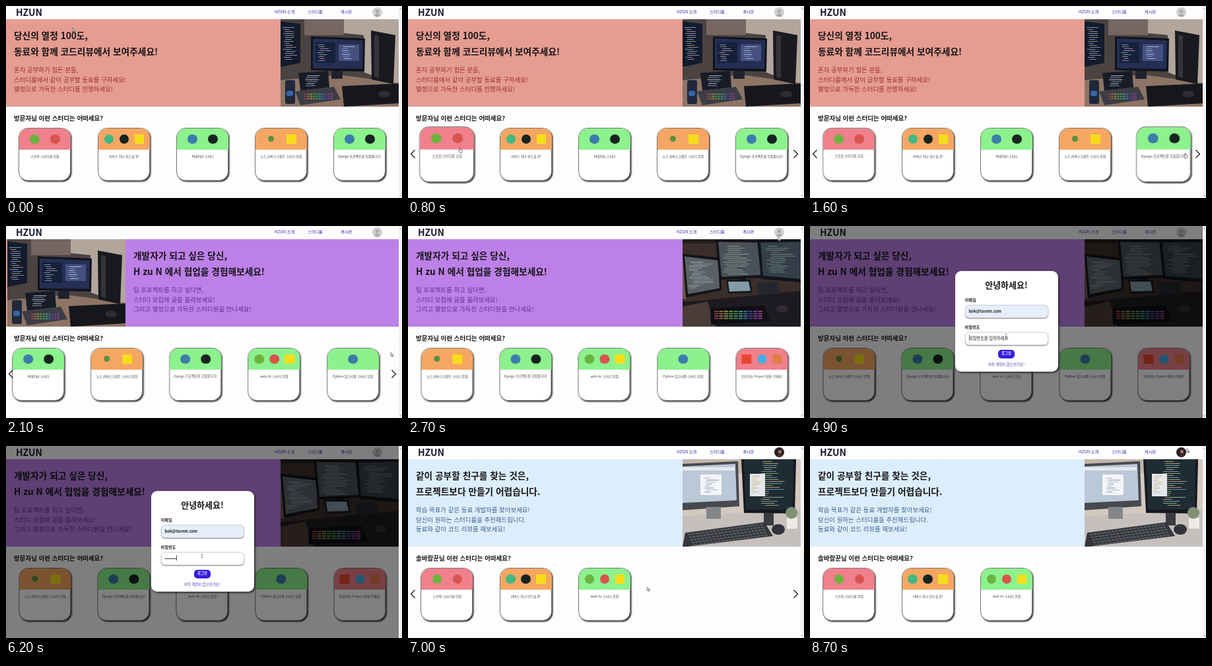
An HTML page that plays this animation: 600x290 px, repeating every 8.8 s.

```html
<!DOCTYPE html>
<html lang="ko">
<head>
<meta charset="utf-8">
<title>스터디 모집</title>
<style>
* { box-sizing: border-box; margin: 0; padding: 0; }
html, body { width: 100%; height: 100%; overflow: hidden; background: #fff; }
body { font-family: "Noto Sans CJK KR", "Noto Sans", sans-serif; }
#stage { position: relative; width: 600px; height: 290px; overflow: hidden; background: #fefdfe; }
#stage div, #stage p, #stage svg, h1, h2 { position: absolute; white-space: nowrap; }
.loop, .loop-step { animation-duration: 8.8s; animation-iteration-count: infinite; }
.loop { animation-timing-function: ease; }
.loop-step { animation-timing-function: step-end; }

#logo { left: 15px; top: -1.5px; font: 700 14px/20px "Noto Sans CJK KR", sans-serif; color: #17182c; }
.nav { top: 3px; font-size: 6.2px; line-height: 11px; font-weight: 500; color: #37239f; }
.avatar { left: 554.5px; top: 1.5px; }

#hero { left: 0; top: 20px; width: 595px; height: 131.5px; overflow: hidden; }
#slides { width: 1785px; height: 132px; animation-name: slides; }
.slide { top: 0; width: 595px; height: 132px; overflow: hidden; }
.slide h1 { left: 12px; top: 13px; font-size: 13.7px; line-height: 23.5px; font-weight: 900; color: #171417; }
.slide p { left: 12px; top: 69px; font-size: 9.45px; line-height: 14.7px; }
.slide svg { left: 416px; top: 0; }

h2 { left: 12px; top: 161.7px; font-size: 9.5px; line-height: 15px; font-weight: 700; color: #161616; }
#studies { left: 0; top: 176px; width: 595px; height: 96px; overflow: hidden; }
.strip { left: 0; top: 0; width: 960px; height: 96px; }
#mover { width: 960px; height: 96px; animation-name: cards; }
.card { top: 8px; width: 79px; height: 80px; border-radius: 14px; background: #fff; border: .5px solid #777; box-shadow: 1.5px 1.5px 2px #333; }
.card .head { left: 0; top: 0; width: 78px; height: 31.5px; border-radius: 13.5px 13.5px 0 0; display: flex; justify-content: space-evenly; align-items: center; }
.card i { width: 14.5px; height: 14.5px; border-radius: 50%; }
.card i.square { border-radius: 0; }
.card i.small { width: 9px; height: 9px; margin: 0 2.75px; }
.card p { left: -10px; width: 98px; top: 37px; text-align: center; font-size: 4.9px; line-height: 9px; color: #3c3c3c; }
.first { animation-name: first; }
.fifth { animation-name: fifth; }
.third { animation-name: third; }
.pass { animation-name: pass; }
.arrow { top: 216px; animation-name: arrows; }

.guest { animation-name: guest; }
.member { animation-name: member; }
#shade { left: 0; top: 0; width: 595px; height: 290px; background: rgba(0,0,0,.5); animation-name: modal; }
#modal { left: 219.5px; top: 68px; width: 156px; height: 152px; border-radius: 9px; background: #fff; box-shadow: 1.5px 1.5px 3px #222; }
#modal h2 { left: 0; width: 156px; top: 11px; text-align: center; font-size: 13px; line-height: 20px; }
.label { left: 15px; font-size: 6.2px; line-height: 10px; font-weight: 700; color: #222; }
.field { left: 15px; width: 126px; height: 20px; border-radius: 6px; border: .6px solid #d0d0d6; box-shadow: 0 1px 1.5px #8c8c92; padding-left: 5px; background: #fff; font-size: 6.3px; line-height: 18.5px; font-weight: 700; color: #686868; }
.field.typed { font-size: 5.9px; color: #222; }
.field.filled { background: #e5eefb; }
.field.caret::after, .field.empty.caret::before { content: ""; display: inline-block; width: .5px; height: 8px; background: #555; vertical-align: -1.5px; }
.field.empty.caret::after { display: none; }
.field.empty.caret::before { margin-right: -.5px; }
#login { left: 65.5px; top: 119px; width: 25px; height: 12.5px; border-radius: 5px; background: #351ddd; color: #fff; text-align: center; font-size: 5.3px; line-height: 11.5px; font-weight: 700; }
#join { left: 0; width: 156px; top: 137px; text-align: center; font-size: 5.4px; line-height: 9px; color: #4937a8; }

#bar { left: 595px; top: 0; width: 5px; height: 290px; background: #f3f2f3; }
#cursor { left: 0; top: 0; animation-name: pointer; }
#cursor svg { left: 0; top: 0; overflow: visible; }
#plain { animation-name: plain; }
#hand { animation-name: hand; }
#beam { animation-name: beam; }

@keyframes slides {
  0%, 21.5% { transform: translateX(0); }
  27.3%, 72.6% { transform: translateX(-595px); }
  78.4%, 100% { transform: translateX(-1190px); }
}
@keyframes cards {
  0%, 21.5% { transform: translateX(0); }
  27.3%, 100% { transform: translateX(-357.6px); }
}
@keyframes first { 0%, 6% { transform: none; } 8.5%, 11% { transform: scale(1.05); } 13.2%, 100% { transform: none; } }
@keyframes fifth { 0%, 15.8% { transform: none; } 18%, 19.4% { transform: scale(1.05); } 21.5%, 100% { transform: none; } }
@keyframes third { 0%, 83% { transform: none; } 85.2%, 92% { transform: scale(1.05); } 94.2%, 100% { transform: none; } }
@keyframes pass { 0% { transform: none; } 1.2% { transform: scale(1.03); } 3%, 100% { transform: none; } }
@keyframes arrows { 0% { opacity: 0; } 5.6% { opacity: 1; } 28.3% { opacity: 0; } 71.5% { opacity: 1; } 92%, 100% { opacity: 0; } }
@keyframes guest { 0% { opacity: 1; } 72.6%, 100% { opacity: 0; } }
@keyframes member { 0% { opacity: 0; } 72.6%, 100% { opacity: 1; } }
@keyframes modal { 0% { opacity: 0; } 34% { opacity: 1; } 71.5%, 100% { opacity: 0; } }
@keyframes plain { 0% { opacity: 1; } 6% { opacity: 0; } 23% { opacity: 1; } 38% { opacity: 0; } 71.5% { opacity: 1; } 83% { opacity: 0; } 92%, 100% { opacity: 1; } }
@keyframes hand { 0% { opacity: 0; } 6% { opacity: 1; } 23% { opacity: 0; } 83% { opacity: 1; } 92%, 100% { opacity: 0; } }
@keyframes beam { 0% { opacity: 0; } 38% { opacity: 1; } 71.5%, 100% { opacity: 0; } }
@keyframes pointer {
  0%, 1% { transform: translate(101px, 33px); }
  7.9%, 11% { transform: translate(78px, 214px); }
  17%, 18.3% { transform: translate(568px, 222px); }
  20.4%, 23% { transform: translate(587px, 223px); }
  29.5%, 34% { transform: translate(561px, 17px); }
  40%, 51% { transform: translate(291px, 135px); }
  53.4%, 71.5% { transform: translate(297px, 166px); }
  77.3%, 81.8% { transform: translate(362.5px, 213px); }
  85.2%, 91% { transform: translate(318px, 222px); }
  97.7%, 100% { transform: translate(571px, 4px); }
}
</style>
</head>
<body>
<div id="stage">
  <div id="logo">HZUN</div>
  <p class="nav" style="left:407px">HZUN 소개</p>
  <p class="nav" style="left:457px">스터디룸</p>
  <p class="nav" style="left:507px">게시판</p>
  <svg class="avatar guest loop-step" width="15" height="15">
    <circle cx="7.5" cy="7.5" r="7.5" fill="#cfcfd1"/>
    <circle cx="7.5" cy="6" r="2.6" fill="#aaa9ad"/><path d="M2.8 12.5Q7.5 6.5 12.2 12.5Q7.5 16 2.8 12.5" fill="#aaa9ad"/>
  </svg>
  <svg class="avatar member loop-step" width="15" height="15">
    <circle cx="7.5" cy="7.5" r="7.5" fill="#2b2024"/>
    <circle cx="8.5" cy="6.5" r="2.6" fill="#a9705c"/><path d="M4 13.8Q8 7 12.5 13Q8 16.5 4 13.8" fill="#4a3238"/>
  </svg>

  <div id="hero"><div id="slides" class="loop"></div></div>

  <h2 class="guest loop-step">방문자님 이런 스터디는 어떠세요?</h2>
  <h2 class="member loop-step">솔바람꾼님 이런 스터디는 어떠세요?</h2>
  <div id="studies">
    <div class="strip guest loop-step"><div id="mover" class="loop"></div></div>
    <div class="strip member loop-step" id="mine"></div>
  </div>
  <svg class="arrow loop-step" style="left:3px" width="9" height="15"><path d="M7.5 1.5L1.5 7.5L7.5 13.5" fill="none" stroke="#111" stroke-width="1.2"/></svg>
  <svg class="arrow loop-step" style="left:583px" width="9" height="15"><path d="M1.5 1.5L7.5 7.5L1.5 13.5" fill="none" stroke="#111" stroke-width="1.2"/></svg>

  <div id="shade" class="loop-step">
    <div id="modal">
      <h2>안녕하세요!</h2>
      <p class="label" style="top:38.5px">이메일</p>
      <div class="field" id="email" style="top:51px"></div>
      <p class="label" style="top:79.5px">비밀번호</p>
      <div class="field" id="password" style="top:91.5px"></div>
      <div id="login">로그인</div>
      <p id="join">아직 계정이 없으신가요?</p>
    </div>
  </div>

  <div id="bar"><svg width="5" height="290" fill="#888"><path d="M1.2 4.5L2.5 3L3.8 4.5zM1.2 286L2.5 287.5L3.8 286z"/></svg></div>
  <div id="cursor" class="loop">
    <svg id="plain" class="loop-step" width="8" height="8"><path d="M0 0V5.6L1.3 4.4L2.3 6.5L3.2 6L2.3 4.1H4z" fill="#fff" stroke="#222" stroke-width=".6"/></svg>
    <svg id="hand" class="loop-step" width="8" height="8"><path d="M0 .6Q.7 -.3 1.3 .6V3L4 3.7V6L3.2 7.8H.4L-1.6 4.6Q-1 3.6 0 4.6z" fill="#fff" stroke="#222" stroke-width=".6"/></svg>
    <svg id="beam" class="loop-step" width="8" height="8"><path d="M-1.3 -2.8H1.3M0 -2.8V2.8M-1.3 2.8H1.3" fill="none" stroke="#444" stroke-width=".6"/></svg>
  </div>
</div>
<script>
const $ = id => document.getElementById(id);

let seed = 7;
const random = () => (seed = seed * 16807 % 2147483647) / 2147483647;
const rect = (x, y, w, h, fill, r = 0) => `<rect x="${x}" y="${y}" width="${w}" height="${h}" rx="${r}" fill="${fill}"/>`;
const poly = (points, fill) => `<polygon points="${points}" fill="${fill}"/>`;
const code = (x, y, w, rows, tints) => Array.from({ length: rows }, (_, i) =>
  rect(x + random() * w * .2, y + i * 3, w * (.25 + random() * .5), 1, tints[i % tints.length])).join('');
const keys = (x, y, w, rows) => Array.from({ length: rows * 10 }, (_, i) =>
  rect(x + i % 10 * w / 10, y + Math.floor(i / 10) * 3.5, w / 10 - 1.2, 2, `hsl(${i % 10 * 34},38%,40%)`)).join('');
const tints = ['#6f8fc0', '#7d9a76', '#9b7ba8', '#8b8f99'];

const photos = [
  rect(0, 0, 179, 132, '#4b4341') + poly('86,0 179,0 179,100 126,80 126,24 86,20', '#b2a59c') +
  rect(36, 0, 60, 24, '#75675f') + poly('0,92 90,84 179,96 179,132 0,132', '#8d7465') +
  poly('0,3 30,7 30,66 0,72', '#141b2b') + code(3, 12, 25, 17, tints) +
  poly('46,26 128,29 127,79 46,77', '#11131d') + poly('49,29 125,32 124,75 49,74', '#252f54') +
  rect(53, 35, 30, 31, '#172039') + code(55, 38, 25, 9, tints) + rect(88, 38, 31, 25, '#46517f') + code(91, 41, 25, 7, ['#a7b4df', '#7b85b6']) +
  rect(77, 78, 17, 12, '#20222a') + poly('137,17 174,24 171,98 138,91', '#191a20') + poly('142,24 149,25 149,89 142,87', '#34343b') +
  poly('27,81 72,78 74,103 30,108', '#181c27') + code(34, 85, 34, 6, ['#b5b9c4', '#768cab']) +
  poly('22,109 81,102 91,121 30,130', '#3c3d45') + keys(36, 112, 44, 3) +
  poly('93,101 179,97 179,127 96,132', '#16171d') +
  '<ellipse cx="157" cy="113" rx="9" ry="5" fill="#2c2d35"/>' + rect(7, 92, 15, 36, '#20283a', 3) + rect(9, 108, 10, 8, '#3766a6', 3),

  rect(0, 0, 179, 132, '#3b2e2a') + rect(0, 0, 179, 6, '#241d1c') + rect(0, 30, 6, 60, '#6d5748') +
  poly('0,95 179,78 179,132 0,132', '#1d1b20') + poly('0,102 38,94 50,132 0,132', '#4a3c36') +
  poly('0,22 57,28 59,77 5,88', '#121318') + poly('3,26 54,32 56,74 8,83', '#5a6165') + code(9, 34, 43, 14, ['#a8adb0', '#8795a0']) +
  poly('50,1 123,2 121,58 56,61', '#121318') + poly('54,4 120,5 118,54 59,57', '#485157') + code(61, 10, 52, 15, ['#8c979c', '#768f86']) +
  poly('113,1 179,0 179,65 119,60', '#10131a') + poly('118,5 179,4 179,60 122,55', '#343e48') + code(125, 10, 49, 14, ['#75828c', '#687d73']) +
  rect(83, 58, 13, 10, '#111216') + poly('66,61 103,61 106,81 69,82', '#17191d') + poly('69,64 100,64 103,78 71,79', '#839ba8') +
  poly('112,66 145,64 148,82 116,84', '#25272e') + poly('42,104 123,100 133,124 43,129', '#0f0f14') + keys(48, 108, 74, 4) +
  '<ellipse cx="151" cy="105" rx="9" ry="6" fill="#332a31"/>',

  rect(0, 0, 179, 132, '#d3c9c0') + rect(0, 0, 90, 21, '#c2b5aa') + poly('0,86 179,76 179,132 0,132', '#c6c0bd') +
  poly('0,7 84,3 86,71 0,77', '#454950') + poly('0,11 80,7 82,62 0,66', '#bac8d8') + rect(0, 12, 79, 5, '#e6e9ed') +
  rect(27, 23, 32, 31, '#f3f4f6') + code(31, 28, 25, 8, ['#aeb6c2', '#7d9aba']) + rect(36, 72, 22, 18, '#85868a') +
  poly('89,0 172,0 170,82 93,81', '#17191f') + poly('93,0 168,0 167,76 96,76', '#202c34') +
  code(117, 3, 43, 23, ['#84a57c', '#b59371', '#6b91aa']) + rect(102, 22, 23, 34, '#e4e6e8') + code(104, 25, 17, 9, ['#b5b6b9', '#e0b85e']) +
  rect(123, 81, 15, 19, '#3b3c40') + rect(158, 88, 16, 17, '#eeeae6', 2) + '<circle cx="165" cy="81" r="9" fill="#7e9273"/>' +
  poly('4,111 124,95 137,116 7,132 0,132', '#35373c') +
  Array.from({ length: 5 }, (_, i) => `<path d="M${8 + i * 2} ${114 + i * 4}L${122 + i * 2} ${98 + i * 4}" stroke="#5c5f66" stroke-width="2" stroke-dasharray="4 1.5"/>`).join('') +
  '<ellipse cx="145" cy="106" rx="10" ry="8" fill="#313338"/>'
];

const banners = [
  ['#e59c91', '#9d2f2d', '당신의 열정 100도,<br>동료와 함께 코드리뷰에서 보여주세요!',
    '혼자 공부하기 힘든 분들,<br>스터디룸에서 같이 공부할 동료를 구하세요!<br>열정으로 가득찬 스터디를 진행하세요!'],
  ['#bd80e8', '#652c91', '개발자가 되고 싶은 당신,<br>H zu N 에서 협업을 경험해보세요!',
    '팀 프로젝트를 하고 싶다면,<br>스터디 모집에 글을 올려보세요!<br>그리고 열정으로 가득찬 스터디원을 만나세요!'],
  ['#dceefb', '#3c5f88', '같이 공부할 친구를 찾는 것은,<br>프로젝트보다 만들기 어렵습니다.',
    '학습 목표가 같은 동료 개발자를 찾아보세요!<br>당신이 원하는 스터디룸을 추천해드립니다.<br>동료와 같이 코드 리뷰를 해보세요!']
];
$('slides').innerHTML = banners.map(([back, ink, title, text], i) =>
  `<div class="slide" style="left:${i * 595}px;background:${back}"><h1>${title}</h1><p style="color:${ink}">${text}</p>
   <svg width="179" height="132">${photos[i]}</svg></div>`).join('');

const badges = {
  spring: ['#6db33f'], java: ['#d9534f'], vue: ['#41b883'], django: ['#16251f'], js: ['#f5de19', 'square'],
  python: ['#3d7cab'], node: ['#57913c', 'small'], swift: ['#ea4630', 'square'], flutter: ['#43aee8'], kotlin: ['#e67b47', 'square']
};
const red = '#f0808b', orange = '#f6a663', green = '#8cf28d';
const spring = [red, '스프링 스터디원 모집', 'spring java'];
const service = [orange, '서비스 하나 만드실 분!', 'vue django js'];
const rtc = [green, 'web rtc 스터디 모집', 'spring java js'];
const studies = [
  spring, service,
  [green, '빅데이터 스터디', 'python django'],
  [orange, '노드,자바스크립트 스터디 모집', 'node js'],
  [green, 'Django 프로젝트원 모집합니다!', 'python django'],
  rtc,
  [green, 'Python 알고리즘 스터디 모집', 'python'],
  [red, '인공지능 Project 팀원 구해요!', 'swift flutter kotlin']
];
const badge = name => {
  const [color, shape = ''] = badges[name];
  return `<i class="${shape}" style="background:${color}"></i>`;
};
const cards = (list, hovers) => list.map(([color, label, tools], i) =>
  `<div class="card loop ${hovers[i] || ''}" style="left:${19.4 + i * 119.2}px;animation-delay:${hovers[i] === 'pass' ? 940 + i * 120 : 0}ms">
   <div class="head" style="background:${color}">${tools.split(' ').map(badge).join('')}</div><p>${label}</p></div>`).join('');
$('mover').innerHTML = cards(studies, ['first', 'pass', 'pass', 'pass', 'fifth']);
$('mine').innerHTML = cards([spring, service, rtc], ['', '', 'third']);

const address = 'bok@tavem.com';
function setField(id, text, hint, caret, filled) {
  const field = $(id);
  field.textContent = text || hint;
  field.className = ['field', text ? 'typed' : 'empty', caret && 'caret', filled && 'filled'].filter(Boolean).join(' ');
}

const start = performance.now();
function draw() {
  const t = (performance.now() - start) % 8800;
  const typed = (from, count) => Math.max(0, Math.min(count, Math.floor((t - from) / 100) + 1));
  const autofilled = t >= 4500;
  const lastKey = [3500, 4100, 4700, 5800].filter(k => k <= t).pop() || 0;
  const blink = t >= 3500 && Math.floor((t - lastKey) / 500) % 2 === 0;
  setField('email', autofilled ? address : address.slice(0, typed(3900, 3)), '이메일을 입력하세요', blink && t < 4700, autofilled);
  setField('password', '•'.repeat(typed(5100, 8)), '비밀번호를 입력하세요', t >= 4700 && (blink || (t > 5100 && t < 5800)));
  requestAnimationFrame(draw);
}
draw();
</script>
</body>
</html>
```
